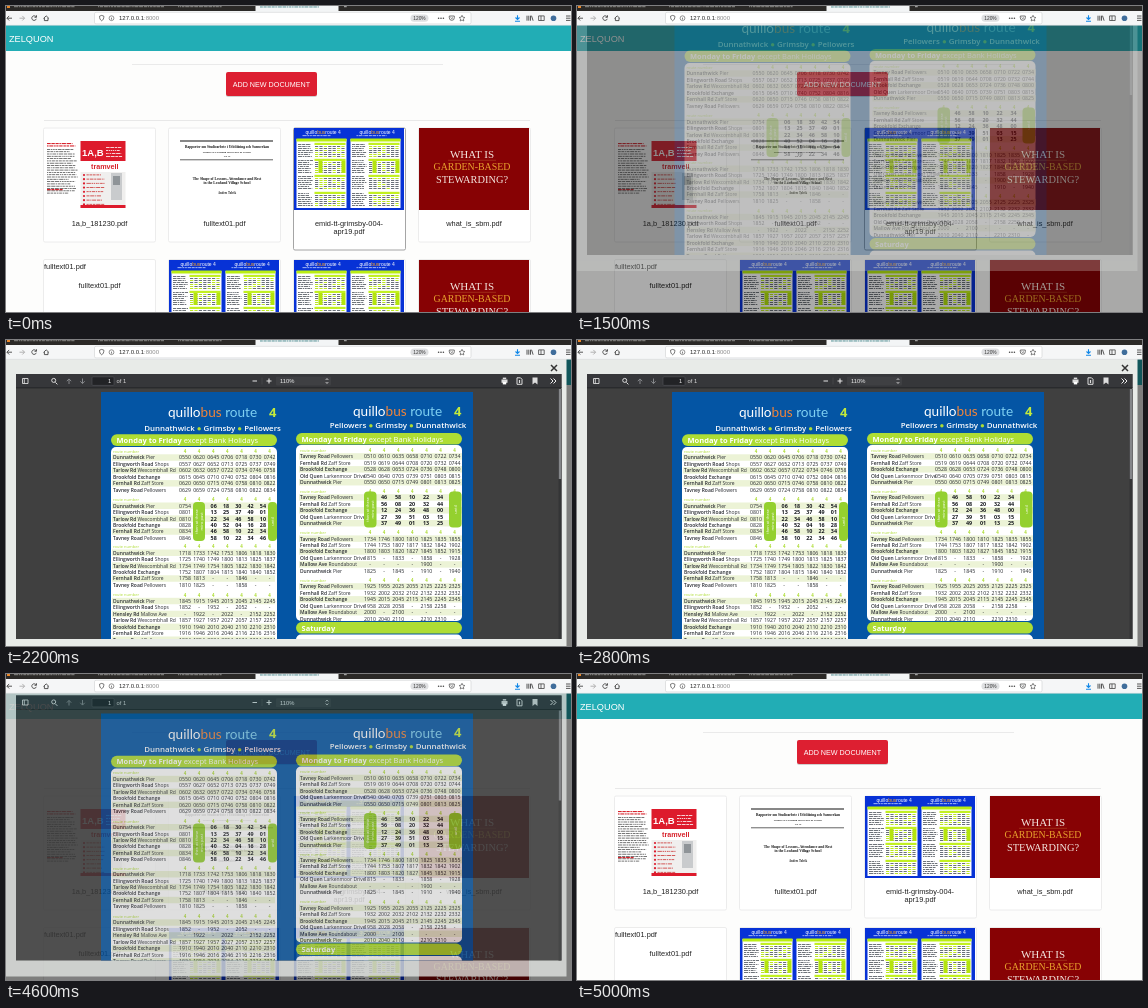
Animation of 565x306 px, one loop 5.9 s. Source, as an HTML page:

```html
<!DOCTYPE html>
<html lang="en">
<head>
<meta charset="utf-8">
<style>
html, body { margin: 0; width: 100%; height: 100%; overflow: hidden; background: #fdfdfc; }
svg { display: block; width: 565px; height: 306px; }
text { font-family: "Liberation Sans", Arial, sans-serif; white-space: pre; }
.pdf text { font-family: "Open Sans", "Noto Sans", sans-serif; }
.serif text { font-family: "Liberation Serif", "Noto Serif", serif; }
</style>
</head>
<body>
<svg id="stage" viewBox="0 0 565 306" xmlns="http://www.w3.org/2000/svg"></svg>
<script>
const LOOP = 5900, BLUE = '#0455a4', LIME = '#aedd34';
const clamp = v => Math.max(0, Math.min(1, v));

let seed = 7;
const rnd = () => (seed = seed * 16807 % 2147483647) / 2147483647;

const rect = (x, y, w, h, fill, more = '') =>
  `<rect x="${x}" y="${y}" width="${w}" height="${h}" fill="${fill}" ${more}/>`;
const text = (x, y, size, str, fill = '#222', more = '') =>
  `<text x="${x}" y="${y}" font-size="${size}" fill="${fill}" ${more}>${str}</text>`;
const path = (d, stroke, width = 1) =>
  `<path d="${d}" fill="none" stroke="${stroke}" stroke-width="${width}"/>`;
const MID = ' text-anchor="middle"', BOLD = ' font-weight="700"', SEMI = ' font-weight="600"';
const range = (n, f) => Array.from({ length: n }, (_, i) => f(i)).join('');

// Lines of unreadably small print
const print = (x, y, w, rows, pitch, fill, h = 0.8) => range(rows, i => {
  let out = '';
  const end = x + w * (0.7 + 0.3 * rnd());
  for (let at = x; at < end;) {
    const len = Math.min(1 + rnd() * 3.5, end - at);
    out += rect(at.toFixed(1), (y + i * pitch).toFixed(1), len.toFixed(1), h, fill);
    at += len + 0.7;
  }
  return out;
});

/* Timetable */
const STOPS = {
  P: ['Dunnathwick', 'Pier'], S: ['Ellingworth Road', 'Shops'], U: ['Tarlow Rd', 'Wexcombhall Rd'],
  R: ['Brookfold Exchange', ''], C: ['Fernhall Rd', 'Zaff Store'], L: ['Tavney Road', 'Pellowers'],
  O: ['Old Quen', 'Larkenmoor Drive'], Z: ['Mallow Ave', 'Roundabout'], W: ['Hensley Rd', 'Mallow Ave'],
};
const COL = 14.1, ROW = 6.45;
const two = n => String(n).padStart(2, '0');
const minutes = s => +s.slice(0, 2) * 60 + +s.slice(2);
const clock = m => two(Math.floor(m / 60) % 24) + two(m % 60);

function table(x, y, numX, stops, starts, kinds, legs) {
  const first = starts.split(' ').filter(Boolean).map(minutes);
  let out = text(x, y - 4.6, 4, 'route number', LIME) +
    range(7, i => text(numX + 6 + i * COL, y - 4.4, 4.4, '4', LIME, MID + BOLD));
  [...stops].forEach((key, r) => {
    const [place, detail] = STOPS[key], base = y + 1.9 + r * ROW;
    if (r % 2 === 0) out += rect(x - 1, base - 5.1, 163, ROW, '#ecf3d6');
    out += text(x, base, 4.95, `<tspan${SEMI}>${place}</tspan> ${detail}`, '#2a2d33');
    first.forEach((start, i) => {
      const leg = legs[kinds[i]][r];
      out += text(numX + 6 + i * COL, base, 5.2, leg == null ? '-' : clock(start + leg), '#24272c', MID);
    });
  });
  return out;
}

const hourly = (x, step, y, start, legs) => range(legs.length, r => range(5, i =>
  text(x + i * step, y + 1.9 + r * ROW, 5.4, two((start + i * 12 + legs[r]) % 60), '#16191e', MID + BOLD)));

const sidePill = (x, y, w, h, lines) => rect(x, y, w, h, '#94d02f', 'rx="4"') +
  lines.map((s, i) => `<g transform="translate(${x + w / 2 + 1.3 + (i - (lines.length - 1) / 2) * 4.4} ${y + h / 2}) rotate(-90)">` +
    text(0, 0, 4, s, '#fff', MID) + '</g>').join('');

const dayPill = (x, y, day, rest = '') => rect(x, y, 166, 11.6, LIME, 'rx="5.8"') +
  text(x + 5.5, y + 8.5, 7.5, `<tspan${BOLD}>${day}</tspan> ${rest}`, '#fff');

const brand = (x, y) => text(x, y, 13.6,
  'quillo<tspan fill="#f0843a">bus</tspan><tspan fill="#7fd0f2"> route</tspan>', '#fff',
  'style="font-family:Lato,sans-serif"') + text(x + 101, y - 0.5, 13, '4', '#c3ea3c', BOLD);

const dot = `<tspan fill="${LIME}"> ● </tspan>`;
const towns = (x, y, list) => text(x, y, 7.9, list.join(dot), '#fff', MID + SEMI);

function timetable() {
  const out = { f: [0, 7, 12, 25, 30, 39], s: [0, 7, 16, 34, 40, 52] };
  const back = { f: [0, 9, 18, 30, 40], s: [0, 10, 26, 41, 51] };
  const names = ['Dunnathwick', 'Grimsby', 'Pellowers'];
  return rect(95, 52, 372, 260, BLUE) +
    brand(162, 77) + towns(206.5, 90.5, names) +
    rect(105, 107, 166, 220, '#fff', 'rx="5"') + dayPill(105, 94.3, 'Monday to Friday', 'except Bank Holidays') +
    table(107, 117.5, 173, 'PSURCL', '0550 0620 0645 0706 0718 0730 0742', 'fffssss', out) +
    table(107, 165.7, 173, 'PSURCL', '0754', 's', out) +
    sidePill(187, 162, 12, 39, ['then at these', 'mins past']) + sidePill(262, 162, 9, 39, ['until']) +
    hourly(207.7, 12.3, 165.7, 6, out.s) +
    table(107, 212.7, 173, 'PSURCL', '1718 1733 1742 1753 1806 1818 1830', 'ssffsff', { s: out.s, f: [0, 7, 12, 22] }) +
    table(107, 261, 173, 'PSWURCL', '1845 1915 1945 2015 2045 2145 2245', 'abababb',
      { a: [0, 7, null, 12, 25, 31, 39], b: [0, null, 7, 12, 25, 31, 39] }) +
    brand(347, 76) + towns(392, 87.5, names.reverse()) +
    rect(290, 105, 166, 176, '#fff', 'rx="5"') + dayPill(290, 93, 'Monday to Friday', 'except Bank Holidays') +
    table(294, 116.4, 358, 'LCROP', '0510 0610 0635 0658 0710 0722 0734', 'fffssss', back) +
    table(294, 157.4, 358, 'LCROP', '', '', back) +
    sidePill(358, 151.5, 12.5, 36, ['then at these', 'mins past']) + sidePill(443, 151.5, 12.5, 36, ['until']) +
    hourly(378, 14, 157.4, 46, back.s) +
    table(294, 198.6, 358, 'LCROZP', '1734 1746 1800 1810 1825 1835 1855', 'sfmflfm',
      { s: [0, 10, 26, 41, null, 51], f: [0, 7, 17], m: [0, 7, 20, 33, null, 45], l: [0, 7, 20, 33, 35, 45] }) +
    table(294, 246.4, 358, 'LCROZP', '1925 1955 2025 2055 2125 2225 2325', 'abacbbc',
      { a: [0, 7, 20, 33, 35, 45], b: [0, 7, 20, 33, null, 45], c: [0, 7, 20] }) +
    rect(290, 294.5, 166, 40, '#fff', 'rx="5"') + dayPill(290, 282, 'Saturday');
}

/* Thumbnails, each 110 by 82 */
function busThumb() {
  const panel = x => rect(x, 11, 50, 69, '#fff') + rect(x, 10.5, 50, 3, '#b9ee12') +
    text(x + 9, 5.5, 5, 'quillo<tspan fill="#ffa51e">bus</tspan>route 4', '#fff') +
    print(x + 6, 7.3, 40, 1, 1, '#c6d6ff') +
    [16, 32, 48, 65].map((y, b) =>
      rect(x + 18, y - 1.2, 31, 2.2, '#c2f021') +
      print(x + 1.5, y, 15, 7, 2, '#4a5058') +
      range(7, c => range(6, r => rect(x + 18.5 + c * 4.4, y + 2 + r * 2, 3.2, 0.9, rnd() < 0.4 ? '#b4e40c' : '#596069'))) +
      (b === 1 ? rect(x + 22, y + 1, 4, 12, '#b4e40c') + rect(x + 45, y + 1, 4, 12, '#b4e40c') : '')).join('');
  return rect(0, 0, 110, 82, '#0732d6') + panel(2.5) + panel(56.5);
}

const redThumb = () => rect(0, 0, 110, 82, '#870204') + '<g class="serif">' +
  text(53, 29.5, 11, 'WHAT IS', '#f4e6df', MID) + text(53, 42, 9.9, 'GARDEN-BASED', '#e8a22e', MID) +
  text(53, 54.5, 10.4, 'STEWARDING?', '#f4e6df', MID) + '</g>' + path('M29 32.3H77', '#b5562b', 0.5);

const leafletThumb = () => print(3, 15, 31, 2, 2.4, '#d8232c', 1.1) + print(3, 21, 31, 20, 2.3, '#555') +
  print(3, 61, 22, 1, 2, '#d8232c', 1.2) +
  rect(36.5, 13, 45, 20, '#dd1b2c') + text(38, 28, 9.5, '1A,B', '#fff', BOLD) +
  print(62, 19, 17, 4, 3, '#fff') + text(47, 41, 7.2, 'tramvell', '#d8232c', BOLD) +
  rect(36.5, 44, 45, 36, '#f0efee') +
  range(8, i => `<circle cx="40" cy="${47 + i * 4.2}" r="1.1" fill="#dd1b2c"/>`) +
  print(42.5, 46.5, 20, 8, 4.2, '#c33') + rect(67, 45, 11, 27, '#c9cbcd') + rect(69, 48, 7, 9, '#8f9498') +
  rect(36.5, 77, 45, 3, '#dd1b2c');

const reportThumb = () => '<g class="serif">' + rect(11, 12.5, 93, 1, '#111') +
  text(58, 19.5, 3.5, 'Rapporter om Studiearbete i Utbildning och Samverkan', '#111', MID + BOLD) +
  text(58, 24.5, 2.8, 'Studies of Learning and Work in Society', '#333', MID + BOLD) +
  text(58, 29, 2.6, 'No 10', '#333', MID + BOLD) + rect(11, 31.5, 93, 0.7, '#222') +
  text(58, 51.5, 3.7, 'The Shape of Lessons, Attendance and Rest', '#111', MID + BOLD) +
  text(58, 56, 3.7, 'in the Lowland Village School', '#111', MID + BOLD) +
  text(58, 66, 3, 'Anders Tolvik', '#222', MID + BOLD) + '</g>';

/* Web page */
const card = (x, y, h, more = '') =>
  rect(x - 0.5, y - 0.5, 112, h, '#fff', 'rx="1.5" stroke="#e7e7e7" stroke-width=".8" ' + more);
const put = (id, x, y) => `<use href="#${id}" x="${x}" y="${y}"/>`;
const label = (x, y, str) => text(x, y, 7.4, str, '#222', MID);

const page = () => rect(0, 0, 565, 306, '#fdfdfc') + rect(0, 19, 565, 26, '#22adb5') +
  text(3, 35.6, 9.2, 'ZELQUON', '#fff') +
  rect(126, 58, 311, 0.8, '#e6e6e6') + rect(38, 114, 486, 0.8, '#e4e4e4') +
  rect(220, 67, 91, 24, '#000', 'rx="2" opacity=".18"') + rect(220, 66, 91, 24, '#dd1f31', 'rx="2"') +
  text(265.4, 80.8, 7.2, 'ADD NEW DOCUMENT', '#fff', MID) +
  card(38, 122.5, 114) + card(163, 122.5, 114) + card(288, 122.5, 122, 'id="hover"') + card(413, 122.5, 114) +
  put('leaflet', 38, 122) + put('report', 163, 122) + put('bus', 288, 122) + put('red', 413, 122) +
  label(93.5, 219.5, '1a,b_181230.pdf') + label(218.5, 219.5, 'fulltext01.pdf') +
  label(343, 219.5, 'emid-tt-grimsby-004-') + label(343, 228.3, 'apr19.pdf') + label(468, 219.5, 'what_is_sbm.pdf') +
  [38, 163, 288, 413].map(x => card(x, 254, 114)).join('') +
  text(38, 262.5, 7.4, 'fulltext01.pdf') + label(93.5, 281.5, 'fulltext01.pdf') +
  put('bus', 163, 254) + put('bus', 288, 254) + put('red', 413, 254);

/* Document viewer */
const viewer = () => rect(0, 19, 560.5, 296, '#e8ebe8') +
  path('M545 25l6 6m0-6l-6 6', '#333', 1.5) +
  rect(10, 34, 545.5, 265, '#404040') +
  `<g class="pdf" clip-path="url(#view)"><g id="sheet">${timetable()}</g></g>` +
  rect(10, 34, 545.5, 14, '#36373a') + rect(10, 47.5, 545.5, 0.8, '#1d1e20') +
  rect(552.5, 49, 3, 250, '#343536') + rect(552.8, 49, 2.4, 90, '#85878a') +
  path('M16.5 38.5h5.5v5h-5.5zM18.3 38.5v5', '#ddd', 0.9) +
  path('M49.4 42.4l2 2M49.7 40.4a2 2 0 1 1-4 0a2 2 0 1 1 4 0', '#ddd') +
  path('M63 44v-5m-2.2 2.2l2.2-2.3l2.2 2.3M76.5 38.5v5m-2.2-2.2l2.2 2.3l2.2-2.3', '#85878a') +
  rect(86, 36.8, 22, 8.6, '#222326', 'rx="1" stroke="#55575b" stroke-width=".6"') +
  text(102, 43.3, 5.8, '1', '#eee') + text(110.5, 43.3, 5.8, 'of 1', '#ddd') +
  path('M246.5 41h4.5M260.5 41h5M263 38.5v5', '#e4e4e4', 1.1) + path('M256 37.5v7', '#55575b', 0.5) +
  rect(270, 36.8, 55, 8.6, '#3f4043', 'rx="1"') + text(274, 43.3, 5.8, '110%', '#eee') +
  path('M319.7 40l1.3-1.5l1.3 1.5M319.7 42l1.3 1.5l1.3-1.5', '#ddd', 0.8) +
  rect(495.5, 39.5, 6, 3.3, '#ddd') + rect(496.8, 37.6, 3.4, 1.5, '#ddd') + rect(496.8, 42, 3.4, 2.4, '#fff') +
  path('M511 37.8h3.5l1.5 1.5v5h-5z', '#ddd') + path('M513.5 40v3', '#ddd', 1.2) +
  '<path d="M526.5 37.5h5v7l-2.5-2l-2.5 2z" fill="#ddd"/>' +
  path('M544.5 38.5l2.5 2.5l-2.5 2.5M547.5 38.5l2.5 2.5l-2.5 2.5', '#eee');

/* Browser bars */
const chrome = () => rect(0, 0, 565, 5, '#2b2927') + rect(249.5, 0, 83, 5, '#f3f5f6') +
  rect(1, 0, 3, 2, '#e8872b') + print(8, 0.2, 62, 1, 1, '#8c8a88', 1) + print(92, 0.2, 70, 1, 1, '#8c8a88', 1) +
  print(172, 0.2, 56, 1, 1, '#8c8a88', 1) + print(254, 0.3, 65, 1, 1, '#7ba9ad', 1.3) + print(338, 0.2, 3, 1, 1, '#bbb', 1) +
  rect(0, 5, 565, 14.3, '#f5f6f7') + rect(0, 18.9, 565, 0.5, '#cfd1d2') +
  rect(88.5, 6.3, 376.5, 11.6, '#fff', 'rx="1.5" stroke="#cfd0d2" stroke-width=".6"') +
  path('M6 12.2H1M3.2 9.9l-2.3 2.3l2.3 2.3', '#444', 0.9) +
  path('M13.5 12.2h5M16.3 9.9l2.3 2.3l-2.3 2.3', '#aaa', 0.9) +
  path('M30 10.8a2.3 2.3 0 1 0 .3 2M30.5 9.3v2h-2', '#444', 0.9) +
  path('M37.5 12.4l2.7-2.5l2.7 2.5M38.4 12v2.6h3.6V12', '#444', 0.9) +
  path('M93.5 10.2l2.2-.8l2.2.8c0 2.4-.8 3.8-2.2 4.6c-1.4-.8-2.2-2.2-2.2-4.6z', '#555', 0.8) +
  '<circle cx="105.5" cy="12.2" r="2.4" fill="none" stroke="#666" stroke-width=".7"/>' + rect(105.1, 11.6, 0.8, 2, '#666') +
  text(113, 14.4, 6, '127.0.0.1<tspan fill="#888">:8000</tspan>') +
  rect(404.5, 8.6, 18, 7.2, '#dfe0e2', 'rx="3.6"') + text(413.5, 14, 4.8, '120%', '#333', MID) +
  range(3, i => `<circle cx="${432.6 + i * 2.4}" cy="12.2" r=".8" fill="#444"/>`) +
  path('M443.3 10h5v1.8a2.5 2.5 0 0 1-5 0zM444.6 11.5l1.2 1.1l1.2-1.1', '#555', 0.8) +
  path('M456 9.3l.9 1.9l2 .3l-1.5 1.4l.4 2.1l-1.8-1l-1.8 1l.4-2.1l-1.5-1.4l2-.3z', '#555', 0.7) +
  path('M511.5 9.3v4m-2-1.8l2 2l2-2M509 15.2h5', '#1187e8', 1.1) +
  path('M521 9.7v5M522.8 9.7v5M524.5 9.7v5M525.5 9.7l1.6 5', '#444', 0.9) +
  path('M532.6 9.9h5.6v4.6h-5.6zM535 9.9v4.6', '#444', 0.8) +
  '<circle cx="547.5" cy="12.2" r="2.8" fill="#3f6d9b"/>' +
  path('M560 10h4.5M560 12.2h4.5M560 14.4h4.5', '#444', 0.9);

const stage = document.getElementById('stage');
stage.innerHTML = `<defs><clipPath id="view"><rect x="10" y="48" width="545.5" height="251"/></clipPath>
  <g id="bus">${busThumb()}</g><g id="red">${redThumb()}</g>
  <g id="leaflet">${leafletThumb()}</g><g id="report">${reportThumb()}</g></defs>
  ${page()}${rect(0, 19, 565, 287, '#000', 'id="shade"')}<g id="modal">${viewer()}</g>${chrome()}`;

const [hover, shade, modal, sheet] = ['hover', 'shade', 'modal', 'sheet'].map(id => document.getElementById(id));

function draw(time) {
  const t = Math.floor(time / 100) * 100;
  const closing = t >= 4500;
  const leave = clamp((t - 4500) / 400);
  const lift = 50 * (closing ? leave : 1 - clamp((t - 1500) / 500));
  modal.setAttribute('opacity', closing ? 1 - leave : clamp((t - 1400) / 400));
  modal.setAttribute('transform', `translate(0 ${-lift})`);
  sheet.setAttribute('transform', `translate(${t < 1900 ? 2.5 : 0} 0)`);
  shade.setAttribute('opacity', 0.5 * (closing ? 1 - clamp((t - 4700) / 300) : clamp((t - 1300) / 300)));
  hover.setAttribute('stroke', t < 4600 ? '#8f8f8f' : '#e7e7e7');
}

const origin = performance.now();
function tick() {
  draw((performance.now() - origin) % LOOP);
  requestAnimationFrame(tick);
}
tick();
</script>
</body>
</html>
```
